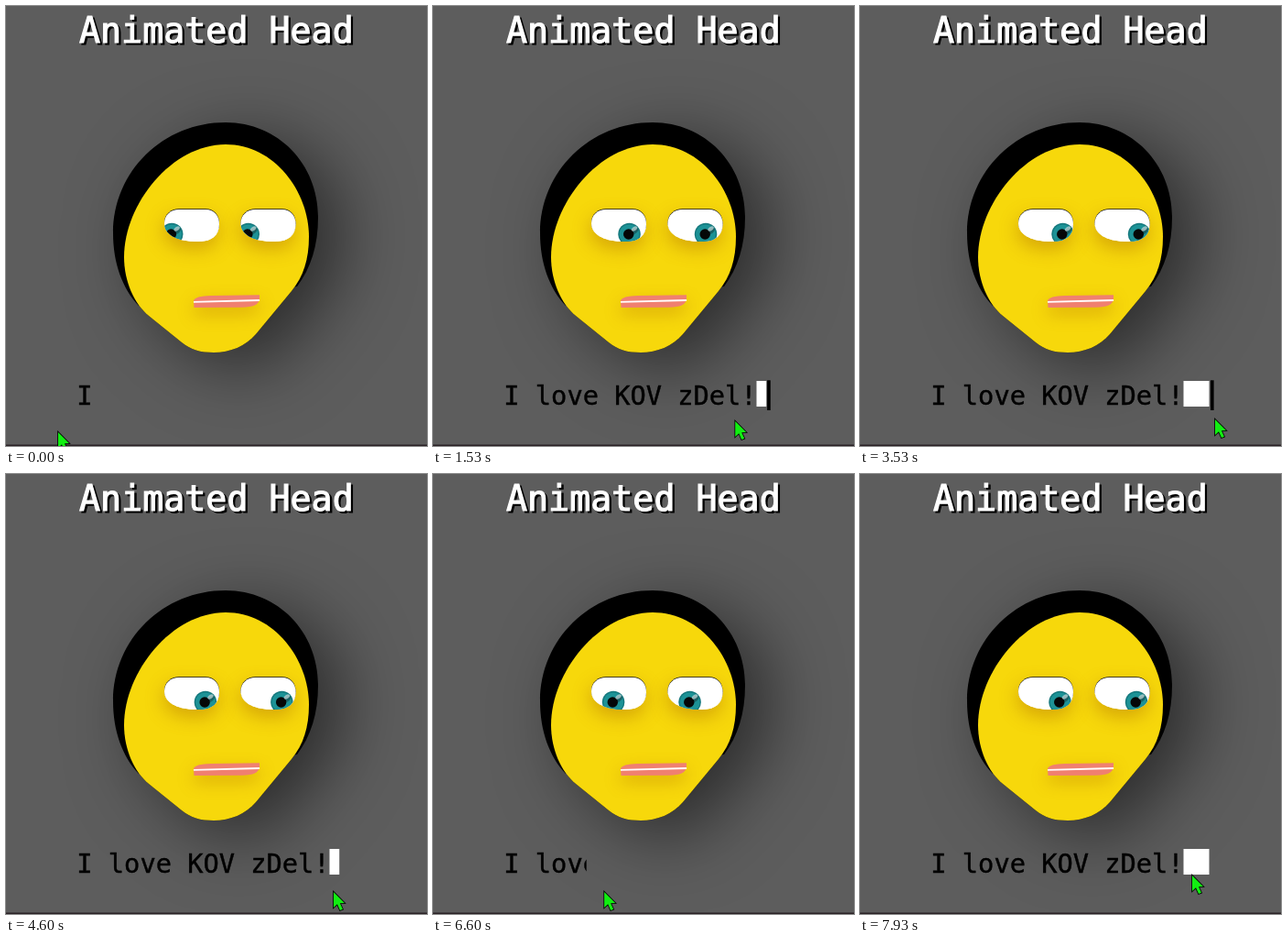
Write an HTML page with a canvas that moves like this. It is 460 px wide and 480 px high and loops after 8000 ms.

```html
<!DOCTYPE html>
<html lang="en">
<head>
<meta charset="utf-8">
<title>Animated Head</title>
<style>
  html, body { margin: 0; width: 100%; height: 100%; overflow: hidden; background: #5d5d5d; }
  canvas { display: block; }
</style>
</head>
<body>
<canvas id="stage" width="460" height="480"></canvas>
<script>
const ctx = document.getElementById('stage').getContext('2d');
const LOOP = 8000;
const MONO = '"DejaVu Sans Mono", "Liberation Mono", monospace';

const hair = new Path2D('M240 127C297 127 341 172 341 230C341 262 333 286 318 306L145 327C127 308 117 280 117 248C117 180 172 127 240 127Z');
const face = new Path2D('M240 151C293 151 331 202 331 252C331 276 325 295 312 311L273 358C262 371 245 378 227 378C212 378 202 375 192 367L156 338C140 325 129 300 129 274C129 216 181 151 240 151Z');
const head = new Path2D(hair);
head.addPath(face);
const eye = new Path2D('M189 222L218 222C228 222 233 229 233 238C233 250 225 256.8 211 257L205 257C186 256 173 249 173 237C173 228 180 222 189 222Z');
const lips = new Path2D('M205 322C205 318 213 316.3 224 316L277 315.2L277 320C276 326 270 328.4 258 328.7L205.5 329Z');
const arrow = new Path2D('M0 0L0 17L4 13.3L7 20L10 18.8L7 12.3L12 12Z');

// Pointer path: time, x, y
const path = [
  [0, 57, 465], [350, 78, 466], [870, 147, 464], [1200, 240, 459], [1530, 330, 453],
  [1730, 369, 450], [1930, 391, 449], [2600, 391, 449], [3130, 392, 450], [3530, 388, 451],
  [4130, 376, 455], [4600, 358, 456], [5000, 305, 458], [5400, 215, 460], [5800, 131, 459],
  [6050, 115, 461], [6600, 187, 456], [7000, 270, 450], [7600, 355, 440], [7930, 363, 438], [8000, 363, 438]
];

// Slope at a knot, zero at turning points so the curve never overshoots
function slope(i, k) {
  const a = path[i - 1], b = path[i], c = path[i + 1];
  if (!a || !c) return 0;
  const l = (b[k] - a[k]) / (b[0] - a[0]);
  const r = (c[k] - b[k]) / (c[0] - b[0]);
  return l * r <= 0 ? 0 : 2 * l * r / (l + r);
}

function pointer(t, k) {
  let i = 0;
  while (i < path.length - 2 && path[i + 1][0] <= t) i++;
  const a = path[i], b = path[i + 1], d = b[0] - a[0], u = (t - a[0]) / d;
  const s = u * u * (3 - 2 * u);
  return a[k] + (b[k] - a[k]) * s
    + d * u * (1 - u) * ((1 - u) * slope(i, k) - u * slope(i + 1, k));
}

function shadow(dx, dy, blur, color) {
  ctx.shadowOffsetX = dx;
  ctx.shadowOffsetY = dy;
  ctx.shadowBlur = blur;
  ctx.shadowColor = color;
}

function fill(shape, color) {
  ctx.fillStyle = color;
  ctx.fill(shape);
}

function oval(x, y, rx, ry, tilt, color) {
  ctx.beginPath();
  ctx.ellipse(x, y, rx, ry, tilt, 0, 7);
  ctx.fillStyle = color;
  ctx.fill();
}

function text(string, x, y, size, weight, color) {
  ctx.font = `${size}px ${MONO}`;
  ctx.lineWidth = weight;
  ctx.fillStyle = ctx.strokeStyle = color;
  ctx.fillText(string, x, y);
  ctx.strokeText(string, x, y);
}

function drawTitle() {
  text('Animated Head', 82.3, 41.8, 38.3, 1.2, '#000');
  text('Animated Head', 80, 39.5, 38.3, 1.2, '#fff');
}

function drawEye(dx, irisX) {
  ctx.save();
  ctx.translate(dx, 0);
  ctx.save();
  shadow(-1, 8, 20, 'rgba(165,95,0,0.42)');
  fill(eye, '#fff');
  ctx.restore();
  ctx.save();
  ctx.translate(0, -0.7);
  fill(eye, '#111');
  ctx.restore();
  fill(eye, '#fff');
  ctx.clip(eye);
  oval(irisX, 249, 12.3, 12.3, 0, '#14777c');
  oval(irisX, 249, 10.8, 10.8, 0, '#1d9296');
  oval(irisX + 5, 246, 5.5, 2.8, -0.6, 'rgba(20,50,55,0.5)');
  oval(irisX - 0.8, 249, 5.7, 5.7, 0, '#050708');
  oval(irisX + 5.5, 243, 3.6, 2, -0.6, 'rgba(190,208,210,0.75)');
  ctx.restore();
}

function drawMouth() {
  ctx.save();
  shadow(0, 7, 18, 'rgba(165,95,0,0.35)');
  fill(lips, '#f08070');
  ctx.restore();
  ctx.beginPath();
  ctx.moveTo(205, 322.8);
  ctx.lineTo(277, 321);
  ctx.lineWidth = 1.8;
  ctx.strokeStyle = '#fff';
  ctx.stroke();
}

// Types for 1.5 s, holds for 3 s, erases for 1.5 s
function typedCount(t) {
  const c = (t - 94 + 6000) % 6000;
  return Math.floor(17 * Math.min(1, c / 1500, (6000 - c) / 1500));
}

function drawTyping(t) {
  const left = 78.3, edge = left + 17.87 * typedCount(t);
  ctx.save();
  ctx.beginPath();
  ctx.rect(left - 1, 400, edge - left + 1, 50);
  ctx.clip();
  text('I love KOV zDel!', 77.3, 435, 28.7, 0.4, '#000');
  ctx.fillStyle = '#fff';
  ctx.fillRect(353.5, 409, 28, 28);
  ctx.restore();
  if ((t + 906) % 1000 < 500) {
    ctx.fillStyle = '#000';
    ctx.fillRect(edge + 0.9, 408.3, 3.6, 32.7);
  }
}

function drawPointer(x, y) {
  ctx.save();
  ctx.translate(x, y);
  ctx.lineWidth = 1.6;
  ctx.strokeStyle = '#000';
  ctx.stroke(arrow);
  fill(arrow, '#12ee12');
  ctx.restore();
}

function draw(t) {
  const x = pointer(t, 1), y = pointer(t, 2);
  const irisX = 181.2 + 0.122 * (x - 57);
  ctx.fillStyle = '#5d5d5d';
  ctx.fillRect(0, 0, 460, 480);
  drawTitle();
  ctx.save();
  shadow(27, 17, 75, 'rgba(0,0,0,0.52)');
  fill(head, '#000');
  ctx.restore();
  fill(face, '#f7d80b');
  drawEye(0, irisX);
  drawEye(83.5, irisX);
  drawMouth();
  drawTyping(t);
  ctx.fillStyle = '#2b2226';
  ctx.fillRect(0, 478.5, 460, 1.5);
  drawPointer(x, y);
}

const start = performance.now();
function tick() {
  draw((performance.now() - start) % LOOP);
  requestAnimationFrame(tick);
}
tick();
</script>
</body>
</html>
```
